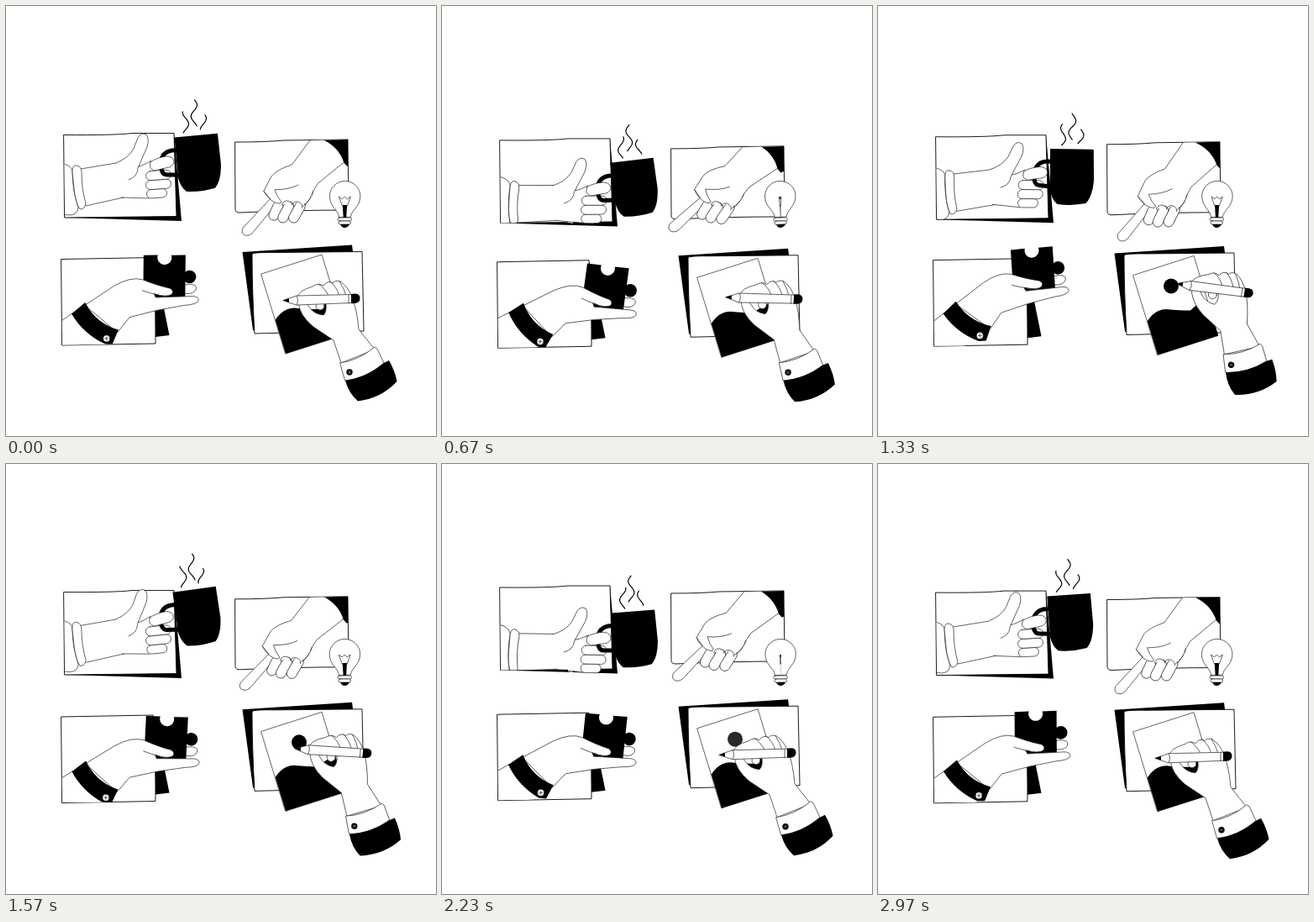
Animation of 512 by 512 pixels, one loop 3 s. Source, as an HTML page:

```html
<!DOCTYPE html>
<html lang="en">
<head>
<meta charset="utf-8">
<title>Four hands</title>
<style>
html, body { margin: 0; width: 100%; height: 100%; overflow: hidden; background: #fff; }
svg { display: block; width: 100%; height: 100%; }
path, rect, circle { fill: #fff; stroke: #222; stroke-width: .7; stroke-linejoin: round; stroke-linecap: round; }
.card { stroke: #000; stroke-width: .9; }
.ink { fill: #000; stroke: none; }
.line { fill: none; }
.plain { stroke: none; }
#filament * { vector-effect: non-scaling-stroke; }
#steam path { fill: none; stroke: #000; stroke-width: 1.2; }
</style>
</head>
<body>
<svg viewBox="0 0 512 512">
<clipPath id="mugClip"><path d="M69 0H300V300H150V251L70 252Z"/></clipPath>
<clipPath id="pointClip"><path d="M200 162L273 162L407 159L408 300H200Z"/></clipPath>
<clipPath id="puzzleClip"><path d="M66 200H300V402L67 403.500Z"/></clipPath>
<clipPath id="paperClip"><path d="M304 319L376 296L405 391L333 414Z"/></clipPath>

<!-- mug -->
<g id="card1">
  <path class="ink" d="M70 252L200 151L209 256Z"/>
  <path class="card" d="M69 153.5Q130 154 150 151.5L200 151.5L203 250.5L70 252Z"/>
  <g clip-path="url(#mugClip)"><g id="arm">
    <path d="M50 188Q76 185 79 196Q79 220 86 240Q85 249 76 249L50 247Z"/>
    <path class="plain" d="M88 194L131 187L160 190V228H140L92 238Z"/>
    <path class="line" d="M89 194L131 187M95 238L140 228"/>
    <path d="M79 197Q79 189 84 190Q90 191 90 198Q90 218 95 235Q94 242 88 242Q83 235 81 218Z"/>
    <g id="palm">
      <path class="plain" d="M131 187Q146 180 152 170L158 156Q162 149 167 154Q171 158 168 168L159 190L172 184L190 190L182 229L140 228Z"/>
      <path class="line" d="M131 187Q146 181 152 170L157 157Q161 150 167 153Q171 158 168 168L157 193Q157 203 146 207M158 191Q164 190 173 184M138 228L170 229"/>
      <rect x="167.500" y="218" width="24" height="10.500" rx="5.200" transform="rotate(-4 180 223)"/>
      <rect x="166.500" y="207" width="30" height="11" rx="5.500" transform="rotate(-4 181 212)"/>
      <rect x="166.500" y="196" width="30" height="11" rx="5.500" transform="rotate(-4 181 201)"/>
      <g id="mug">
        <path class="line" d="M204 171.500Q190 171 186 180Q182 201 192 201H206" style="stroke:#000;stroke-width:5"/>
        <path class="ink" d="M200.500 156.500L252 152L256 189Q256 209 249 217Q232 222 215 221Q208 216 205 205Z"/>
        <g id="steam"><path/><path/><path/></g>
      </g>
      <path d="M172 186Q178 181 191 179Q200 179 200 186Q199 192 190 193L177 196Q169 194 172 186Z"/>
    </g>
  </g></g>
</g>

<!-- pointing at the bulb -->
<g id="card2">
  <path class="card" d="M273 162Q310 162 330 160L407 159L408 243Q340 243 278 246Q273 246 273 242Z"/>
  <g clip-path="url(#pointClip)"><g id="pointer">
    <path d="M392 119L341 190Q323 196 317 204L308 222L316 231L284 266Q281 273 287 275Q293 276 297 270L321 240L355 240Q364 232 367 221L372 212L450 146Z"/>
    <path id="sleeve" class="ink" d="M362 154Q395 162 403 187L407 191L450 165V90H370Z"/>
    <rect x="317" y="233" width="12" height="24" rx="6" transform="rotate(24 323 245)"/>
    <rect x="329" y="233" width="12" height="27" rx="6" transform="rotate(27 335 246)"/>
    <rect x="342" y="232" width="12" height="28" rx="6" transform="rotate(28 348 246)"/>
    <path class="plain" d="M316 228L325 221L354 214L366 226L357 236L340 234L330 238L322 237Z"/>
    <path class="line" d="M308 222Q313 231 321 235Q329 238 329 234Q324 229 321 220Q338 220 349 214M330 238Q330 234 336 233Q343 234 342 238Q344 233 349 234Q355 236 354 241M355 239Q364 232 367 221"/>
  </g></g>
</g>
<g id="bulb">
  <path d="M396.500 251C396 243 385.500 239 385.500 226.500A18.200 18 0 0 1 422 226.500C422 239 411 243 410.500 251Z"/>
  <g id="filament">
    <path class="line" d="M-3 238L-7 227L-3 230L0 227L3 230L7 227L3 238"/>
    <path class="ink" d="M-2.700 237H2.700L1.700 253H-1.700Z"/>
  </g>
  <rect x="395" y="252" width="16.500" height="4" rx="2"/>
  <rect x="396" y="256" width="14.500" height="4" rx="2"/>
  <path class="ink" d="M398 260H409Q407 264 403 264Q400 264 398 260Z"/>
</g>

<!-- puzzle piece -->
<g id="card3">
  <path class="ink" d="M175 300L185 345L194.500 392L178 394Z"/>
  <path class="card" d="M66 301.500L175 299.500Q178 330 178 402L67 404Z"/>
  <g clip-path="url(#puzzleClip)"><g id="holder">
    <path d="M205 332L219 331Q226 331 226 335Q226 340 219 342H205Z"/>
    <path class="ink" d="M163 297L180 296.500A8.500 8.500 0 1 0 196 296.500L213 296V346.500H163Z"/>
    <circle class="ink" cx="218" cy="322" r="7.800"/>
    <path class="plain" d="M40 394L79 367L95 356L131 386L118 404L40 420Z"/>
    <path class="line" d="M40 394L79 367"/>
    <path d="M94 357L128 334Q148 322 162 326Q180 333 195 336Q200 339 197 343Q191 347 176 343L178 347L222 345Q229 345 229 350Q227 355 212 356Q180 361 147 371L133 389Z"/>
    <path class="line" d="M162 339Q170 342 182 344"/>
    <path class="ink" d="M78 367.500L94 354L99 362Q112 380 134 386L127 403H118Q92 391 78 367.500Z"/>
    <circle cx="120" cy="396.500" r="4"/>
    <path class="line" d="M118 396.500H122M120 394.500V398.500"/>
  </g></g>
</g>

<!-- drawing -->
<g id="card4">
  <path class="ink" d="M281.500 293L412 284.500L414 300L300 389L294 386Z"/>
  <path class="card" d="M293 295Q296 293 320 293.500L424 292.500L426 387L296 390Q293 340 293 295Z"/>
  <path d="M304 319L376 296L405 391L333 414Z"/>
  <path class="ink" clip-path="url(#paperClip)" d="M315 385Q325 360 343 359.500Q360 361 372 361Q380 352 396 348L430 420H320Z"/>
  <circle id="dot" class="ink" cx="349" cy="332" r="9"/>
  <g id="writer">
    <path fill-rule="evenodd" d="M348 352Q352 348 357 352L360 357Q366 367 378 368Q382 364 381 355L350 352L347 347Q348 339 365 334Q372 329 378 333Q383 326 389 330Q392 326 398 328Q406 333 412 346Q418 362 420 385L439 409L399 425L390 398L366 382Q349 368 348 352Z"/>
    <path class="plain" d="M348 345H385V353H348Z"/>
    <circle cx="374" cy="357" r="5"/>
    <path class="line" d="M372 331Q380 336 384 345M386 328Q394 335 397 345M397 328Q403 337 405 345"/>
    <path d="M398 425Q420 422 439 406L442 408L450 425Q428 444 404 446Z"/>
    <path class="ink" d="M404 446Q430 442 450 425L456 422Q463 434 465.500 447Q447 467 419 470.500Q408 461 404 446Z"/>
    <circle class="ink" cx="409" cy="436" r="3.700"/>
    <path class="line" d="M407.500 434.500L410.500 437.500M410.500 434.500L407.500 437.500" style="stroke:#999"/>
    <path d="M330 350.500L346 345L412 343.500V353.500L346 356Z"/>
    <path class="line" d="M346 345Q349 350 346 356M408 344V354"/>
    <path class="ink" d="M330 350.500L337 348V353Z"/>
    <path class="ink" d="M411 343Q421.500 341 421.500 348Q421.500 355 411 354Z"/>
  </g>
</g>
</svg>
<script>
const $ = id => document.getElementById(id);
const place = (id, transform) => $(id).setAttribute('transform', transform);
const turn = (id, deg, x, y) => place(id, `rotate(${deg} ${x} ${y})`);
const clamp = v => Math.max(0, Math.min(1, v));
const ease = v => (v = clamp(v), v * v * (3 - 2 * v));
const LOOP = 3000, SWING = 1500, TAU = Math.PI * 2;

// time, pen tip x, y, rotation
const penKeys = [
  [540, 330, 350, 0], [930, 360, 319, 12], [990, 359, 320, 12],
  [1080, 345, 328, 10], [1160, 352, 337, 10], [1245, 344, 334, 9],
  [1330, 356, 328.5, 9], [1420, 354, 331, 9], [1760, 330, 350, 0]
];

function penAt(t) {
  const i = penKeys.findIndex(k => k[0] > t);
  if (i < 1) return penKeys[0].slice(1);
  const a = penKeys[i - 1], b = penKeys[i];
  const p = ease((t - a[0]) / (b[0] - a[0]));
  return [1, 2, 3].map(n => a[n] + (b[n] - a[n]) * p);
}

// start x, top, bottom, wave offset
const plumes = [[214, 126, 151, 4.5], [224, 112, 143, 0], [235, 130, 147, 11]];

function drawSteam(t) {
  [...$('steam').children].forEach((path, i) => {
    const [x, top, bottom, shift] = plumes[i];
    let d = '';
    for (let y = top; y <= bottom; y++) {
      const dx = 3.6 * Math.cos(TAU * ((y - 145 + shift) / 27 + t / SWING));
      d += (d ? 'L' : 'M') + (x + dx).toFixed(2) + ' ' + y;
    }
    path.setAttribute('d', d);
  });
}

function draw(t) {
  const swing = (peak, period = SWING) => Math.cos(TAU * (t - peak) / period);
  const bob = Math.sin(TAU * t / LOOP);
  [6.5, 8, 3.3, 4.3].forEach((amp, i) => place('card' + (i + 1), `translate(0 ${amp * bob})`));

  const arm = 5.2 - 5.7 * swing(100);
  const tilt = 0.5 - 8.7 * swing(360);
  const bend = (tilt - arm) / 2;
  turn('arm', arm, 10, 215);
  turn('palm', bend, 138, 208);
  turn('mug', bend, 188, 187);
  drawSteam(t);

  const point = 3.1 + 7 * swing(420) + 1.7 * swing(500, SWING / 2);
  turn('pointer', point, 401, 153);
  turn('sleeve', -0.45 * point, 389, 173);
  turn('bulb', -0.25 * point, 403, 262);
  place('filament', `translate(403.5 0) scale(${Math.cos(TAU * t / LOOP)} 1)`);

  const lift = 5.5 * swing(320) - 2;
  place('holder', `translate(0 ${lift}) rotate(${3 + 7.8 * swing(450)} 110 375)`);

  const [x, y, r] = penAt(t);
  place('writer', `translate(${x - 330} ${y - 350}) rotate(${r} 330 350)`);
  $('dot').setAttribute('r', 9 * ease((t - 1000) / 290));
  $('dot').style.opacity = 1 - ease((t - 2130) / 400);
}

function frame(now) {
  draw(now % LOOP);
  requestAnimationFrame(frame);
}
draw(0);
requestAnimationFrame(frame);
</script>
</body>
</html>
```
